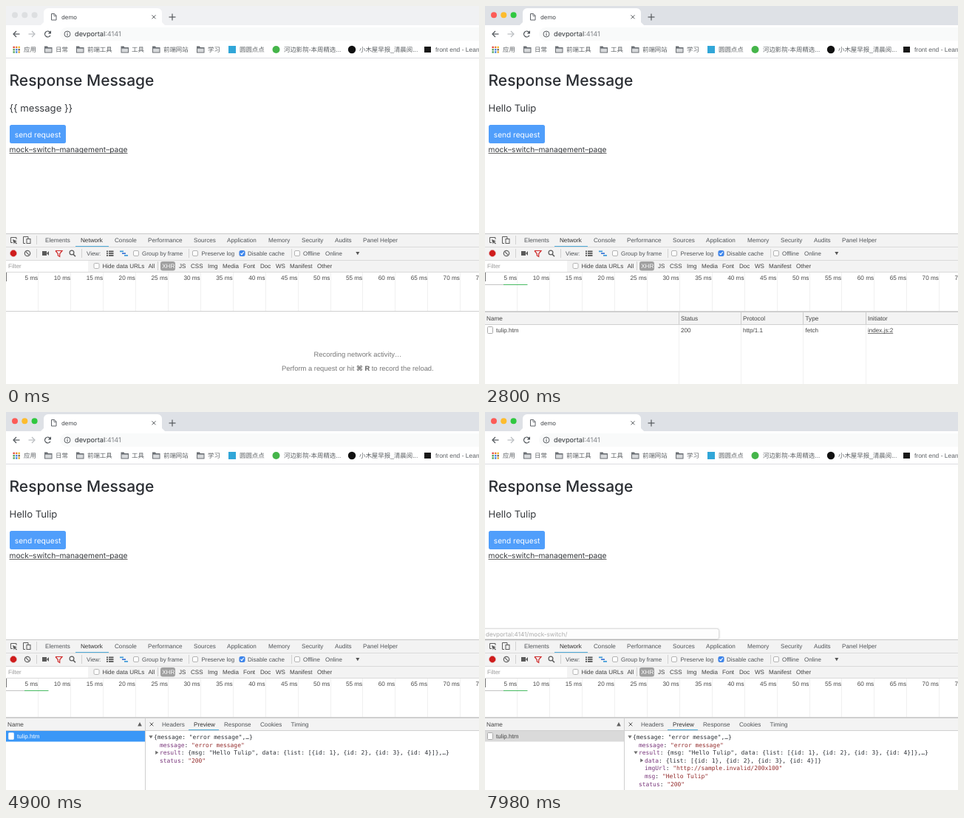
These frames come from a looping animation (640 by 512 pixels, 8 s). An HTML page with a canvas:

```html
<!DOCTYPE html>
<html lang="en">
<head>
<meta charset="utf-8">
<title>demo</title>
<style>
html, body { margin: 0; width: 100%; height: 100%; overflow: hidden; background: #fff; }
canvas { display: block; width: 640px; height: 512px; }
</style>
</head>
<body>
<canvas id="stage" width="640" height="512"></canvas>
<script>
const ctx = document.getElementById('stage').getContext('2d');
const LOOP = 8000;
const SANS = '"Liberation Sans", "Noto Sans CJK SC", "Noto Sans CJK", sans-serif';
const WIDE = 'Inter, sans-serif';
const MONO = '"DejaVu Sans Mono", monospace';
const INK = '#36393d', UI = '#505458', KEY = '#78357a', STR = '#932b2b', DARK = '#2c3036';
const HOST = 'devportal', PORT = ':4141';

// Moments at which the picture changes, in ms
const AT = {
  focus: 770, clearOn: 1600, clearOff: 2000, reply: 2380, hover: 3500,
  tip: 3780, open: 4130, body: 4270, expand: 5500, status: 7800
};

function rect(x, y, w, h, color) {
  ctx.fillStyle = color;
  ctx.fillRect(x, y, w, h);
}

function round(x, y, w, h, r, fill, stroke) {
  ctx.beginPath();
  ctx.roundRect(x, y, w, h, r);
  if (fill) { ctx.fillStyle = fill; ctx.fill(); }
  if (stroke) { ctx.strokeStyle = stroke; ctx.lineWidth = 1; ctx.stroke(); }
}

function disc(x, y, r, color) {
  ctx.beginPath();
  ctx.arc(x, y, r, 0, Math.PI * 2);
  ctx.fillStyle = color;
  ctx.fill();
}

function ring(x, y, r, color, width = 1) {
  ctx.beginPath();
  ctx.arc(x, y, r, 0, Math.PI * 2);
  ctx.strokeStyle = color;
  ctx.lineWidth = width;
  ctx.stroke();
}

function line(color, width, ...p) {
  ctx.beginPath();
  for (let i = 0; i < p.length; i += 2) ctx.lineTo(p[i], p[i + 1]);
  ctx.strokeStyle = color;
  ctx.lineWidth = width;
  ctx.stroke();
}

function poly(color, ...p) {
  ctx.beginPath();
  for (let i = 0; i < p.length; i += 2) ctx.lineTo(p[i], p[i + 1]);
  ctx.fillStyle = color;
  ctx.fill();
}

// Draws text centred on y and returns its right end
function text(s, x, y, size, color = UI, font = SANS, weight = '') {
  ctx.font = `${weight} ${size}px ${font}`;
  ctx.fillStyle = color;
  ctx.fillText(s, x, y + size * 0.36);
  return x + ctx.measureText(s).width;
}

function row(items, y, size, color) {
  for (const [s, x] of items) text(s, x, y, size, color);
}

function cross(x, y, r, color) {
  line(color, 1, x - r, y - r, x + r, y + r);
  line(color, 1, x - r, y + r, x + r, y - r);
}

function folder(x) {
  poly('#6b6f74', x, 54.5, x + 4, 54.5, x + 5, 56, x + 10.5, 56, x + 10.5, 63.5, x, 63.5);
  rect(x + 1, 57.6, 8.5, 4.9, '#d8dadc');
}

function checkbox(x, y, on) {
  round(x - 3.5, y - 3.5, 7, 7, 1.5, on ? '#3b87f0' : '#fff', on ? '#3b7de0' : '#b4b4b4');
  if (on) line('#fff', 1.2, x - 2, y, x - 0.5, y + 1.8, x + 2.2, y - 2);
}

function browser(t) {
  const live = t >= AT.focus;
  rect(0, 0, 640, 27, live ? '#dee1e6' : '#f0f1f3');
  const lights = live ? ['#fc5b57', '#fdbc2e', '#30c840'] : ['#dddfe1', '#dddfe1', '#dddfe1'];
  lights.forEach((c, i) => disc(12 + i * 13.3, 12.2, 4, c));

  round(51, 3, 160, 30, 6, '#fff');
  poly('#fff', 47, 26, 51, 22, 51, 26);
  poly('#fff', 215, 26, 211, 22, 211, 26);
  line('#5f6368', 1, 61.5, 10.5, 65.5, 10.5, 68, 13, 68, 19, 61.5, 19, 61.5, 10.5);
  line('#5f6368', 0.8, 65, 10.5, 65, 13.5, 68, 13.5);
  text('demo', 75, 14.8, 7.9, '#45494d', WIDE);
  cross(200, 14.8, 2.5, '#55595d');
  line('#55595d', 1.2, 220.5, 15, 229.5, 15);
  line('#55595d', 1.2, 225, 10.5, 225, 19.5);

  rect(0, 26, 640, 45, '#fff');
  round(73, 29, 590, 18, 9, '#f9fafa');
  for (const [x, d, c] of [[14, 1, '#50555a'], [35, -1, '#b9bcc0']]) {
    line(c, 1.2, x - 4 * d, 38, x + 4.5 * d, 38);
    line(c, 1.2, x, 34, x - 4 * d, 38, x, 42);
  }
  ctx.beginPath();
  ctx.arc(56.5, 38, 3.9, 0.5, 5.5);
  ctx.strokeStyle = '#50555a';
  ctx.lineWidth = 1.3;
  ctx.stroke();
  poly('#50555a', 61, 33.2, 61, 37.4, 56.8, 37.4);
  ring(83, 38, 4, '#5f6368');
  rect(82.5, 37.2, 1.1, 3.2, '#5f6368');
  rect(82.5, 35.3, 1.1, 1.1, '#5f6368');
  const end = text(HOST, 93, 38, 9.2, '#2f3337', WIDE);
  text(PORT, end, 38, 9.2, '#808488', WIDE);

  const dots = ['#e3493d', '#e98034', '#f0b92f', '#5b9e52', '#4486e8', '#806a55', '#54a35a', '#4787df', '#e2a92e'];
  dots.forEach((c, i) => rect(9.5 + (i % 3) * 3.5, 54.7 + Math.floor(i / 3) * 3.3, 2.4, 2.4, c));
  for (const x of [52, 95, 155.5, 198, 258]) folder(x);
  row([['应用', 24], ['日常', 67], ['前端工具', 110], ['工具', 170], ['前端网站', 213],
    ['学习', 273], ['圆圆点点', 316], ['河边影院-本周精选...', 376],
    ['小木屋早报_清晨阅...', 478], ['front end - Learning', 581]], 59, 8.45, '#5c6064');
  rect(301, 54, 10, 10, '#31a6d8');
  disc(365.5, 59, 5, '#45b54a');
  disc(468, 59, 5.2, '#111');
  rect(566, 55, 9, 8, '#181818');
  rect(0, 70, 640, 1, '#dcdde0');
}

function page(t) {
  text('Response Message', 4.5, 100, 21, '#2b2e33', WIDE, 500);
  text(t < AT.reply ? '{{ message }}' : 'Hello Tulip', 4.5, 138.7, 13.1, INK, WIDE);
  round(5, 161, 76, 25, 2.5, '#509efb');
  text('send request', 11.8, 174, 10.15, '#fff', WIDE);
  const end = text('mock–switch–management–page', 4.5, 194.3, 10.2, INK, WIDE);
  rect(4.5, 199, end - 4.5, 1, '#666');
}

function toolbar(t) {
  rect(0, 308, 640, 53, '#f3f3f3');
  for (const y of [308, 326, 344, 360]) rect(0, y, 640, 1, y === 308 ? '#c9c9c9' : '#dadada');
  for (const x of [41, 102, 247, 386]) rect(x, 329, 1, 12, '#d2d2d2');
  rect(41, 311, 1, 12, '#d2d2d2');

  line('#5a5a5a', 1, 9, 320.5, 6.5, 320.5, 6.5, 313.5, 14, 313.5, 14, 316);
  poly('#5a5a5a', 9, 316, 15, 318.5, 12.6, 319.3, 15, 321.5, 14, 322.4, 11.8, 320.2, 10.8, 322.5);
  line('#5a5a5a', 1, 26, 321.5, 23.5, 321.5, 23.5, 312.5, 30, 312.5, 30, 315);
  ctx.strokeRect(28, 315.5, 5, 6);

  row([['Elements', 53], ['Console', 147], ['Performance', 192], ['Sources', 254],
    ['Application', 299], ['Memory', 355], ['Security', 400], ['Audits', 445],
    ['Panel Helper', 483]], 317, 8.15);
  text('Network', 101, 317, 8.15, '#303030');
  rect(94, 325, 45, 1, '#4fabd9');

  const clear = t >= AT.clearOn && t < AT.clearOff;
  disc(10, 335, 4.4, '#cf1c1c');
  ring(10, 335, 4.6, '#e09a9a', 0.6);
  if (clear) round(21, 328, 16, 14, 2, '#d5d5d5');
  const ink = clear ? '#2b2b2b' : '#606060';
  ring(29, 335, 3.7, ink, 1.2);
  line(ink, 1.2, 26.4, 332.4, 31.6, 337.6);
  rect(49, 332, 6, 6, '#5a5a5a');
  poly('#5a5a5a', 55, 335, 58, 332, 58, 338);
  line('#cf2a2a', 1.2, 67, 331.5, 76, 331.5, 72.7, 335.5, 72.7, 339.5, 70.3, 338, 70.3, 335.5, 67, 331.5);
  ring(89, 334, 2.9, '#5a5a5a', 1.2);
  line('#5a5a5a', 1.5, 91, 336.2, 94, 339.3);
  for (let i = 0; i < 3; i++) {
    rect(136, 331.5 + i * 2.8, 2, 1.8, '#555');
    rect(139, 331.5 + i * 2.8, 6.5, 1.8, '#555');
    rect(154 + i * 3, 331.5 + i * 2.8, 5, 1.7, i === 1 ? '#3b74d8' : '#3f9bd8');
  }
  for (const x of [176, 256, 394]) checkbox(x, 335, false);
  checkbox(319.5, 335, true);
  row([['View:', 109], ['Group by frame', 184], ['Preserve log', 264.5],
    ['Disable cache', 327], ['Offline', 402], ['Online', 432]], 335, 7.95);
  poly('#555', 473.3, 333, 478.3, 333, 475.8, 337.2);

  rect(0, 345, 111, 15, '#fff');
  text('Filter', 3, 352.5, 8, '#9a9a9a');
  checkbox(122.5, 352, false);
  rect(205, 346, 1, 12, '#cfcfcf');
  round(209, 346, 20, 12.5, 3, '#a0a0a0');
  text('XHR', 211.2, 352, 8.05, '#fff');
  row([['Hide data URLs', 130.5], ['All', 192.5], ['JS', 234], ['CSS', 250], ['Img', 273],
    ['Media', 293], ['Font', 321], ['Doc', 344], ['WS', 365], ['Manifest', 384],
    ['Other', 421]], 352, 8.05, '#404040');
}

function timeline(t) {
  rect(0, 361, 640, 151, '#fff');
  ctx.textAlign = 'right';
  for (let i = 1; i < 16; i++) {
    const x = i * 43.9;
    rect(Math.floor(x), 361, 1, 52, '#f0f0f0');
    text(`${i * 5} ms`, x - 0.7, 368, 8.2, '#484848');
  }
  ctx.textAlign = 'left';
  rect(0, 361, 1, 12, '#777');
  rect(0, 413, 640, 1, '#cfcfcf');
  if (t >= AT.reply) {
    rect(0, 377, 25, 1, '#c4c4c4');
    rect(25, 377, 32.5, 1, '#48bb62');
  }
}

function emptyList() {
  const c = '#777';
  text('Recording network activity…', 416.5, 472, 9.4, c);
  let x = text('Perform a request or hit ', 373, 490.5, 9.4, c);
  x = text('⌘ R', x, 490.5, 9.4, '#606060', '"Liberation Sans", "DejaVu Sans", sans-serif', 'bold');
  text(' to record the reload.', x, 490.5, 9.4, c);
}

function sortArrow(x) {
  poly('#606060', x - 2.8, 425.5, x + 2.8, 425.5, x, 420);
}

function fileIcon(fill, stroke) {
  round(3.5, 434.5, 7, 9, 1, fill, stroke);
}

function header() {
  rect(0, 415, 640, 16, '#f3f3f3');
  rect(0, 414, 640, 1, '#d0d0d0');
  rect(0, 431, 640, 1, '#d0d0d0');
  text('Name', 2, 423, 8.2, '#444');
}

function list(t) {
  const hover = t >= AT.hover;
  header();
  if (hover) rect(0, 432, 640, 15, '#f6f7f9');
  for (const x of [262, 346, 430, 515]) {
    rect(x, 415, 1, 16, '#cdcdcd');
    rect(x, 432, 1, 80, '#f1f1f1');
  }
  row([['Status', 265], ['Protocol', 349], ['Type', 433.5], ['Initiator', 518]], 423, 8.2, '#444');
  fileIcon('#fff', '#aaa');
  row([['tulip.htm', 15], ['200', 265], ['http/1.1', 349], ['fetch', 433.5]], 439, 8.1, '#444');
  const end = text('index.js:2', 518, 439, 8.1, '#444');
  rect(518, 443, end - 518, 0.8, '#555');
  if (hover) sortArrow(255);
  if (t >= AT.tip) {
    ctx.save();
    ctx.shadowColor = 'rgba(0,0,0,.3)';
    ctx.shadowBlur = 4;
    ctx.shadowOffsetY = 1;
    round(98, 439, 132, 17, 1, '#f5f5f5');
    ctx.restore();
    round(98.5, 439.5, 131, 16, 1, null, '#d4d4d4');
    text(`http://${HOST}${PORT}/api/tulip.htm`, 104, 448, 8.15, '#333');
  }
}

function arrow(x, y, open) {
  if (open) poly('#6e6e6e', x - 2.6, y - 1.8, x + 2.6, y - 1.8, x, y + 2.2);
  else poly('#6e6e6e', x - 1.8, y - 2.6, x + 2.2, y, x - 1.8, y + 2.6);
}

function field(x, y, key, value, color = STR) {
  let end = text(key, x, y, 7.95, KEY, MONO);
  end = text(': ', end, y, 7.95, DARK, MONO);
  text(value, end, y, 7.95, color, MONO);
}

function tree(open) {
  const y = i => 440 + i * 10.65;
  const ids = '[' + [1, 2, 3, 4].map(n => `{id: ${n}}`).join(', ') + ']';
  arrow(196, y(0), true);
  text('{message: "error message",…}', 200, y(0), 7.95, DARK, MONO);
  field(208, y(1), 'message', '"error message"');
  arrow(204, y(2), open);
  field(208, y(2), 'result', `{msg: "Hello Tulip", data: {list: ${ids}},…}`, DARK);
  if (open) {
    arrow(212, y(3), false);
    field(216, y(3), 'data', `{list: ${ids}}`, DARK);
    field(216, y(4), 'imgUrl', '"http://sample.invalid/200x100"');
    field(216, y(5), 'msg', '"Hello Tulip"');
  }
  field(208, y(open ? 6 : 3), 'status', '"200"');
}

function detail(t) {
  const open = t >= AT.expand;
  header();
  sortArrow(181);
  rect(0, 432, 188, 14.5, open ? '#dadada' : '#3a97f7');
  fileIcon('#fff', open ? '#aaa' : '#d5e8fd');
  text('tulip.htm', 15, 439, 8.1, open ? '#444' : '#fff');
  rect(188, 415, 1, 97, '#cfcfcf');
  cross(197, 423, 2.4, '#5a5a5a');
  row([['Headers', 211], ['Response', 295], ['Cookies', 344], ['Timing', 385.5]], 423, 8.15);
  text('Preview', 254, 423, 8.15, '#303030');
  rect(247, 430, 41, 1, '#4fabd9');
  if (t >= AT.body) tree(open);
}

function statusBubble(t) {
  ctx.save();
  ctx.globalAlpha = Math.min(1, (t - AT.status) / 180);
  ctx.save();
  ctx.shadowColor = 'rgba(0,0,0,.3)';
  ctx.shadowBlur = 3;
  round(-4, 294, 320.5, 14, 2.5, '#fdfdfd');
  ctx.restore();
  round(-4, 293.5, 320.5, 14, 2.5, null, '#dedede');
  text(`${HOST}${PORT}/mock-switch/`, 1, 301, 8.1, '#acacac', WIDE);
  ctx.restore();
}

function draw(t) {
  ctx.textRendering = 'geometricPrecision';
  rect(0, 0, 640, 512, '#fff');
  browser(t);
  page(t);
  toolbar(t);
  timeline(t);
  if (t < AT.reply) emptyList();
  else if (t < AT.open) list(t);
  else detail(t);
  if (t >= AT.status) statusBubble(t);
}

const start = performance.now();
function frame() {
  draw((performance.now() - start) % LOOP);
  requestAnimationFrame(frame);
}
frame();
</script>
</body>
</html>
```
